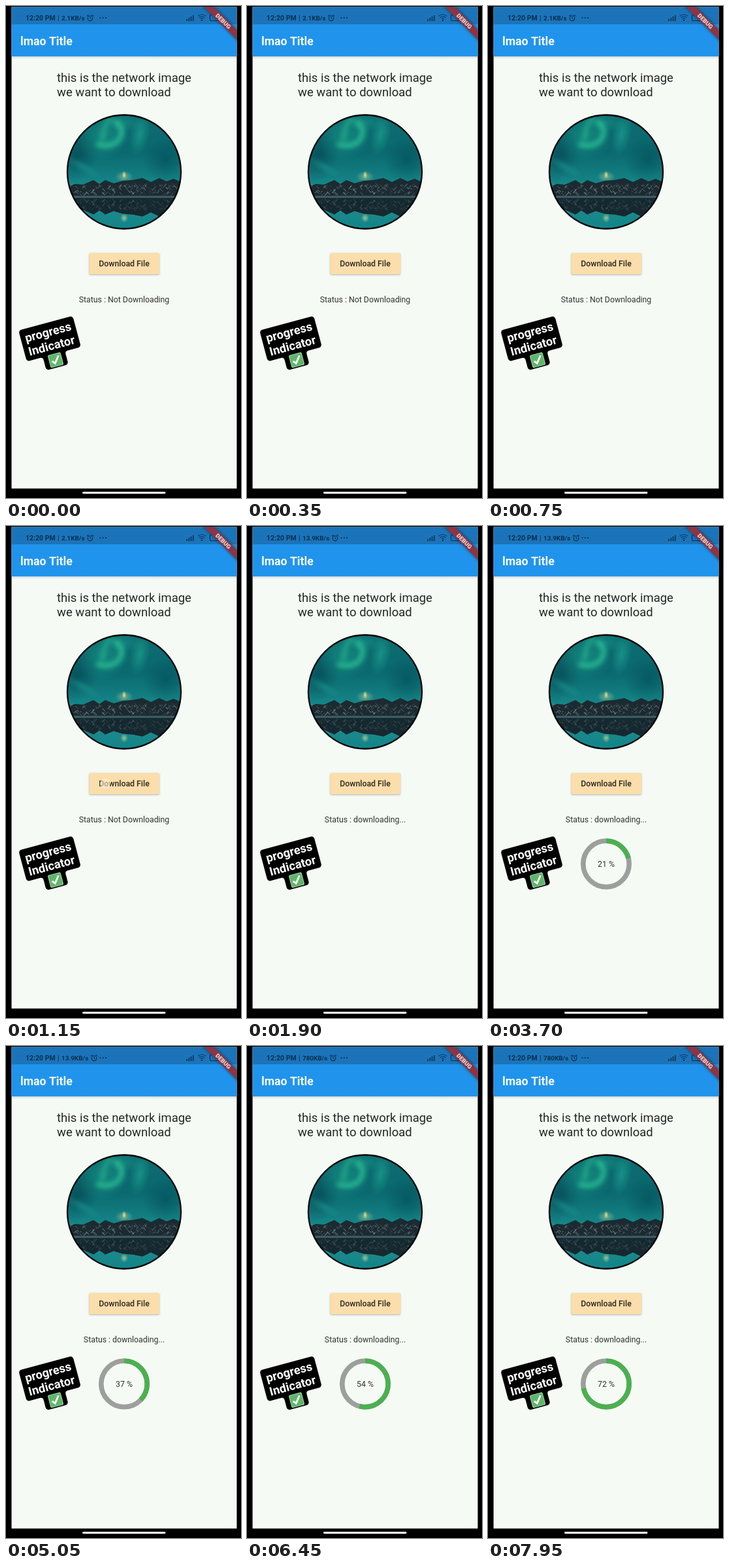
An HTML page with a canvas for the animation above (8 s loop, 360 by 752 pixels).

```html
<!DOCTYPE html>
<html lang="en">
<head>
<meta charset="utf-8">
<title>Download progress</title>
<style>
html, body { margin: 0; width: 100%; height: 100%; overflow: hidden; background: #000; }
canvas { display: block; width: 360px; height: 752px; }
</style>
</head>
<body>
<canvas id="stage"></canvas>
<script>
const W = 360, H = 752, LOOP = 8000;
const canvas = document.getElementById('stage');
const ctx = canvas.getContext('2d');
const dpr = window.devicePixelRatio || 1;
canvas.width = W * dpr;
canvas.height = H * dpr;

const SCREEN = { x: 8.5, y: 1.5, w: 345, h: 736 };
const TAP = { x: 152, y: 394, down: 1030, up: 1250 };
const SPEEDS = [[5600, '780KB/s'], [1600, '13.9KB/s'], [0, '2.1KB/s']];
const RING = { x: 181, y: 516.5, r: 35.2, start: 2000 };
const clamp = (v, a = 0, b = 1) => Math.min(b, Math.max(a, v));

function rect(x, y, w, h, fill) {
  ctx.fillStyle = fill;
  ctx.fillRect(x, y, w, h);
}

function rounded(x, y, w, h, r, fill) {
  ctx.beginPath();
  ctx.roundRect(x, y, w, h, r);
  ctx.fillStyle = fill;
  ctx.fill();
}

function disc(x, y, r, fill) {
  ctx.beginPath();
  ctx.arc(x, y, r, 0, Math.PI * 2);
  ctx.fillStyle = fill;
  ctx.fill();
}

function text(str, x, y, size, color, weight = 400, align = 'left') {
  ctx.font = `${weight} ${size}px Roboto, sans-serif`;
  ctx.textAlign = align;
  ctx.fillStyle = color;
  ctx.fillText(str, x, y);
}

function line(points, color, width) {
  ctx.beginPath();
  points.forEach(([x, y]) => ctx.lineTo(x, y));
  ctx.strokeStyle = color;
  ctx.lineWidth = width;
  ctx.stroke();
}

function arc(x, y, r, from, to, color, width) {
  ctx.beginPath();
  ctx.arc(x, y, r, from, to);
  ctx.strokeStyle = color;
  ctx.lineWidth = width;
  ctx.stroke();
}

function gradient(y0, y1, stops) {
  const g = ctx.createLinearGradient(0, y0, 0, y1);
  stops.forEach(([at, color]) => g.addColorStop(at, color));
  return g;
}

// Soft elliptical light, tilted by `turn`.
function glow(x, y, rx, ry, turn, rgb, alpha) {
  ctx.save();
  ctx.translate(x, y);
  ctx.rotate(turn);
  ctx.scale(rx, ry);
  const g = ctx.createRadialGradient(0, 0, 0, 0, 0, 1);
  g.addColorStop(0, `rgba(${rgb},${alpha})`);
  g.addColorStop(1, `rgba(${rgb},0)`);
  disc(0, 0, 1, g);
  ctx.restore();
}

function random(seed) {
  return () => (seed = (seed * 16807) % 2147483647) / 2147483647;
}

const RIDGE = [[92, 276], [106, 272], [118, 273], [134, 266], [143, 272], [152, 266], [165, 271], [179, 267],
  [194, 266], [209, 263], [222, 269], [235, 263], [246, 268], [257, 264], [272, 271]];

function mountains(rock, snow) {
  ctx.beginPath();
  ctx.moveTo(92, 291);
  RIDGE.forEach(([x, y]) => ctx.lineTo(x, y));
  ctx.lineTo(272, 291);
  ctx.fillStyle = rock;
  ctx.fill();
  const rnd = random(71);
  for (let i = 0; i < 130; i++) {
    const x = 95 + rnd() * 172, y = 271 + rnd() * 15, lean = 1.5 + rnd() * 3.5;
    line([[x, y], [x + lean * (rnd() < 0.5 ? 1 : -1), y + lean]], snow, 0.4 + rnd() * 0.9);
  }
}

function aurora() {
  glow(150, 200, 42, 36, -0.5, '30,165,140', 0.5);
  glow(205, 196, 15, 34, 0.2, '28,165,145', 0.65);
  glow(178, 178, 34, 13, 0.1, '28,155,140', 0.5);
  glow(118, 246, 30, 9, 0.5, '30,160,150', 0.45);
  ctx.save();
  ctx.filter = `blur(${3.5 * dpr}px)`;
  ctx.lineCap = 'round';
  ctx.beginPath();
  ctx.moveTo(142, 212);
  ctx.quadraticCurveTo(164, 217, 174, 203);
  ctx.quadraticCurveTo(182, 188, 169, 178);
  ctx.strokeStyle = 'rgba(48,205,155,.7)';
  ctx.lineWidth = 8;
  ctx.stroke();
  line([[147, 203], [151, 184], [160, 172]], 'rgba(42,195,150,.5)', 7);
  ctx.restore();
}

function photo() {
  ctx.save();
  ctx.beginPath();
  ctx.arc(181, 253.5, 87, 0, Math.PI * 2);
  ctx.clip();
  rect(92, 164, 180, 128, gradient(166, 278, [[0, '#0d6c70'], [0.5, '#0a686f'], [1, '#16898a']]));
  glow(110, 228, 30, 42, 0.3, '5,68,80', 0.6);
  glow(245, 235, 36, 34, -0.5, '4,78,88', 0.65);
  aurora();
  glow(181, 261, 14, 9, 0, '190,210,150', 0.55);
  glow(181, 258, 3.5, 6, 0, '250,220,140', 0.95);
  mountains('#1c2a31', 'rgba(160,176,182,.5)');
  rect(92, 291, 180, 52, gradient(291, 342, [[0, '#3c6a70'], [0.35, '#1c8a8c'], [1, '#118488']]));
  ctx.save();
  ctx.translate(0, 590);
  ctx.scale(1, -1.02);
  mountains('#16282f', 'rgba(105,130,136,.4)');
  ctx.restore();
  rect(92, 290, 180, 2.5, '#3f575d');
  glow(181, 324, 6, 7, 0, '190,210,145', 0.8);
  ctx.restore();
  arc(181, 253.5, 87, 0, Math.PI * 2, '#020606', 2.3);
}

function statusBar(t) {
  const ink = 'rgba(5,28,52,.78)';
  const speed = SPEEDS.find(([from]) => t >= from)[1];
  rect(SCREEN.x, SCREEN.y, SCREEN.w, 27, '#1b74b9');
  text('12:20 PM', 30, 22, 10.5, ink, 600);
  text('|', 79, 22, 10, ink, 500);
  text(speed, 85, 22, 9.9, ink, 600);
  const x = speed.length > 7 ? 135 : speed === '780KB/s' ? 132 : 129;
  arc(x, 18.8, 3.8, 0, Math.PI * 2, ink, 1.1);
  line([[x, 16.5], [x, 19], [x + 1.8, 19.8]], ink, 0.9);
  line([[x - 5, 15.5], [x - 2.5, 13.5]], ink, 1.1);
  line([[x + 5, 15.5], [x + 2.5, 13.5]], ink, 1.1);
  for (let i = 0; i < 3; i++) disc(144.5 + i * 4.3, 18, 1.1, ink);
  for (let i = 0; i < 4; i++) rect(276 + i * 3.3, 20 - i * 2, 2, 3 + i * 2, 'rgba(5,28,52,.6)');
  for (let i = 1; i < 4; i++) arc(300, 22, i * 3, -2.35, -0.79, 'rgba(5,28,52,.65)', 1.2);
  disc(300, 22, 1.2, ink);
  ctx.beginPath();
  ctx.roundRect(312.5, 13.5, 16, 9, 2);
  ctx.strokeStyle = ink;
  ctx.lineWidth = 1.1;
  ctx.stroke();
}

function debugBanner() {
  ctx.save();
  ctx.beginPath();
  ctx.rect(SCREEN.x, SCREEN.y, SCREEN.w, 60);
  ctx.clip();
  ctx.translate(332.8, 23.2);
  ctx.rotate(Math.PI / 4);
  ctx.shadowColor = 'rgba(0,0,0,.5)';
  ctx.shadowBlur = 5 * dpr;
  rect(-45, -5.3, 90, 10.6, '#8c3544');
  ctx.shadowColor = 'transparent';
  text('DEBUG', 0, 3.2, 9, '#e6dcde', 900, 'center');
  ctx.restore();
}

function appBar() {
  rect(SCREEN.x, 77, SCREEN.w, 4, gradient(77, 81, [[0, 'rgba(60,80,90,.2)'], [1, 'rgba(60,80,90,0)']]));
  rect(SCREEN.x, 28, SCREEN.w, 49, '#2094ec');
  text('lmao Title', 22, 60, 17.7, '#f6fbff', 600);
}

function button(t) {
  ctx.save();
  ctx.shadowColor = 'rgba(0,0,0,.28)';
  ctx.shadowBlur = 2.5 * dpr;
  ctx.shadowOffsetY = dpr;
  rounded(127.5, 377.5, 107.5, 32.5, 1.5, '#fbdeab');
  ctx.restore();
  text('Download File', 181, 398, 12.3, '#2b2520', 500, 'center');
  if (t >= TAP.down && t < TAP.up) disc(TAP.x, TAP.y, 8, 'rgba(253,236,207,.6)');
}

function progress(t) {
  if (t < RING.start) return;
  const p = clamp(0.21 + (t - 3700) * 0.00012);
  const top = -Math.PI / 2;
  arc(RING.x, RING.y, RING.r, 0, Math.PI * 2, '#9d9f9d', 7.6);
  arc(RING.x, RING.y, RING.r, top, top + p * Math.PI * 2, '#4bb050', 7.6);
  text(`${Math.floor(p * 100 + 1e-6)} %`, 181, 521, 12.3, '#303330', 400, 'center');
}

function sticker() {
  ctx.save();
  ctx.translate(67, 508.5);
  ctx.rotate(-15 * Math.PI / 180);
  rounded(-43, -24.6, 86, 49.2, 4.5, '#000');
  rounded(-17.5, 10, 35, 35.5, 4.5, '#000');
  for (const side of [-1, 1]) {
    ctx.beginPath();
    ctx.moveTo(side * 22, 24.6);
    ctx.quadraticCurveTo(side * 17.5, 24.6, side * 17.5, 29);
    ctx.lineTo(side * 16, 24);
    ctx.fill();
  }
  text('progress', 0, -4, 18.3, '#fff', 700, 'center');
  text('Indicator', 0, 17.4, 18.3, '#fff', 700, 'center');
  rounded(-10, 23.8, 20.5, 20, 2.5, '#a9d8ae');
  rounded(-9, 24.8, 18.5, 18, 2, '#5fb66a');
  line([[-5.5, 34], [-1.8, 38.5], [6.2, 28.3]], '#fff', 2.8);
  ctx.restore();
}

function draw(t) {
  ctx.setTransform(dpr, 0, 0, dpr, 0, 0);
  rect(0, 0, W, H, '#000');
  rect(SCREEN.x, SCREEN.y, SCREEN.w, SCREEN.h, '#f5faf5');
  statusBar(t);
  appBar();
  debugBanner();
  text('this is the network image', 78, 116, 18.5, '#242724');
  text('we want to download', 78, 138, 18.5, '#242724');
  photo();
  button(t);
  const state = t < 1300 ? 'Not Downloading' : 'downloading...';
  text(`Status : ${state}`, 181, 452.5, 12.3, '#303330', 400, 'center');
  progress(t);
  sticker();
  rounded(117, 742.6, 127.5, 2.8, 1.4, '#fff');
}

const begin = performance.now();
function tick() {
  draw((performance.now() - begin) % LOOP);
  requestAnimationFrame(tick);
}
tick();
</script>
</body>
</html>
```
